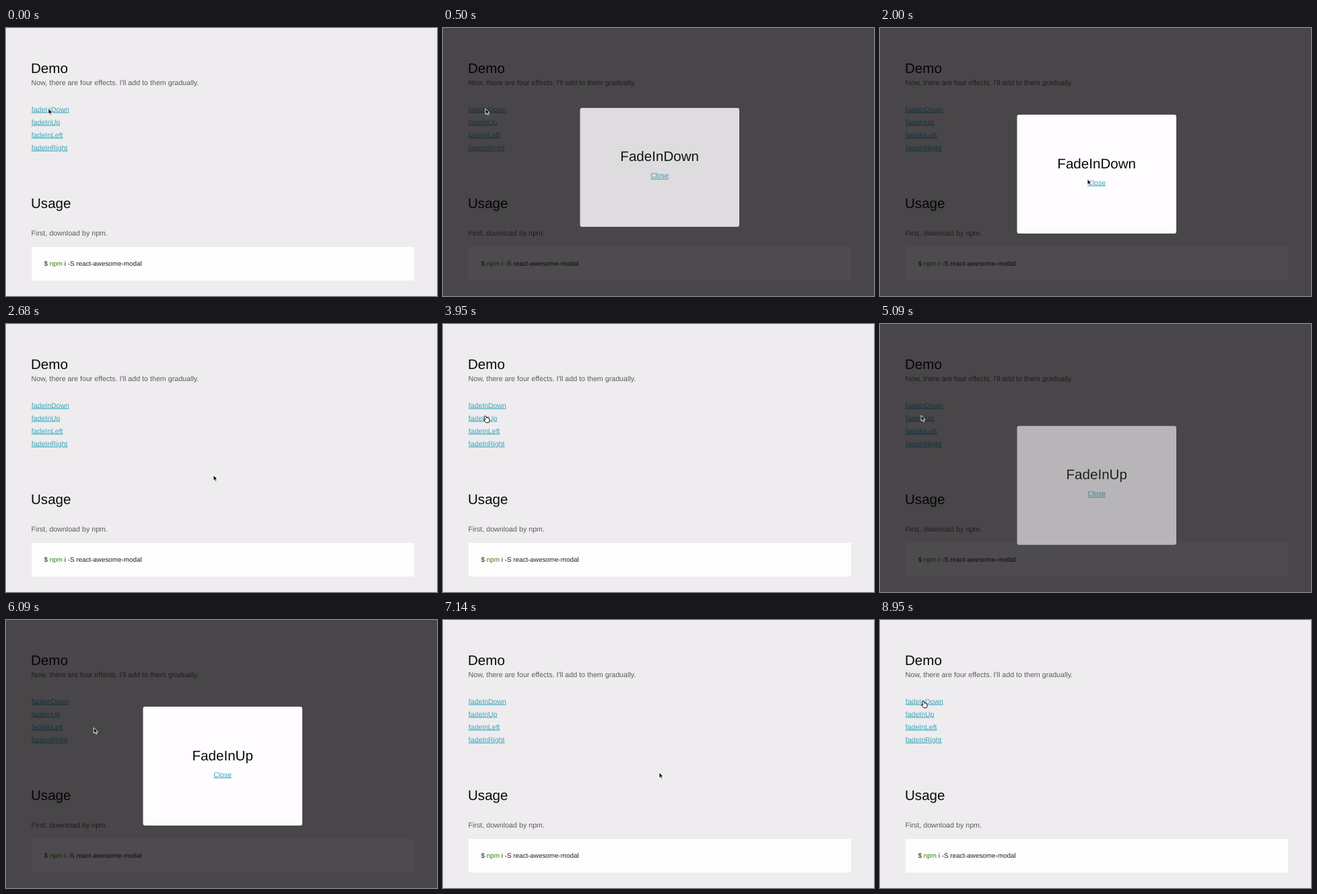
An HTML page that plays this animation: 640x399 px, repeating every 8.99 s.

```html
<!DOCTYPE html>
<html lang="en">
<head>
<meta charset="utf-8">
<title>Modal demo</title>
<style>
  html, body { margin: 0; width: 100%; height: 100%; overflow: hidden; background: #eeecee; }
  svg { display: block; font: 10.7px "Liberation Sans", Arial, sans-serif; fill: #5d5b5d; text-rendering: geometricPrecision; }
  .heading { font-size: 20.6px; fill: #0a0a0a; }
  .link { font-size: 10.5px; fill: #37a8ba; text-decoration: underline; }
  .code { font-size: 9.85px; fill: #222; }
  .middle { text-anchor: middle; }
</style>
</head>
<body>
<svg width="640" height="399" viewBox="0 0 640 399">
  <rect width="640" height="399" fill="#eeecee"/>
  <text class="heading" x="37" y="67">Demo</text>
  <text x="37.5" y="84.5">Now, there are four effects. I'll add to them gradually.</text>
  <g class="link">
    <text x="37.8" y="124.5">fadeInDown</text>
    <text x="37.8" y="143.5">fadeInUp</text>
    <text x="37.8" y="162.5">fadeInLeft</text>
    <text x="37.8" y="181.5">fadeInRight</text>
  </g>
  <text class="heading" x="37" y="267.5">Usage</text>
  <text x="37.5" y="308.8">First, download by npm.</text>
  <rect x="38" y="326" width="568" height="50" fill="#fefdfe"/>
  <text class="code" x="56.6" y="354">$ <tspan fill="#2f8500">npm</tspan> i -S react-awesome-modal</text>

  <rect id="mask" width="640" height="399" fill="#030003"/>
  <g id="panel">
    <rect x="203.5" y="129" width="236.5" height="177" rx="3" fill="#fefcff"/>
    <text id="title" class="heading middle" x="321.7" y="208.5"></text>
    <text class="link middle" x="321.6" y="233.5">Close</text>
  </g>

  <g id="cursor" stroke-linejoin="round">
    <path id="arrow" d="M0 0V8.4L2 6.6 3.3 9.6 4.8 9 3.5 6.1H6.1Z" fill="#000" stroke="#fff" stroke-width=".9"/>
    <path id="hand" d="M.1.2Q1.1-.8 1.9.4L2.9 3Q4-.1 4.6 3.2 5.6 2.4 6 3.8 7 3.3 7 5.2V7.2L6 9.8H2L-1.8 5.6Q-1.6 4.2.9 5.8L-.6 1.6Q-.7.5.1.2Z"
          fill="#fff" stroke="#111" stroke-width="1"/>
  </g>
</svg>
<script>
const LOOP = 8990, MASK_MS = 300, PANEL_DELAY = 290, PANEL_MS = 400, CLOSE_MS = 300, TRAVEL = 59;
const $ = id => document.getElementById(id);
const clamp = v => Math.min(1, Math.max(0, v));

const modals = [
  { title: 'FadeInDown', open: 0, close: 2150, from: -TRAVEL },
  { title: 'FadeInUp', open: 4659, close: 6830, from: TRAVEL },
];
// Cursor stops: time, x, y
const stops = [
  [0, 63, 120], [1020, 63, 120], [1700, 317, 232], [1900, 308, 225], [2780, 308, 225],
  [3560, 82, 142], [3900, 62, 137], [5000, 61, 136], [5820, 61, 136],
  [6620, 321, 227], [7730, 321, 227], [8560, 72, 126], [8860, 63, 121], [LOOP, 63, 121],
];
const handTimes = [[2030, 2200], [3640, 4720], [6600, 6900], [8600, LOOP]];

// CSS "ease": cubic-bezier(.25, .1, .25, 1)
function ease(x) {
  x = clamp(x);
  const bezier = (s, a, b) => 3 * s * (1 - s) ** 2 * a + 3 * s * s * (1 - s) * b + s ** 3;
  let low = 0, high = 1;
  for (let i = 0; i < 20; i++) {
    const mid = (low + high) / 2;
    if (bezier(mid, .25, .25) < x) low = mid; else high = mid;
  }
  return x === 1 ? 1 : bezier(low, .1, 1);
}

function cursorAt(t) {
  const i = stops.findIndex(stop => stop[0] > t);
  const [t0, x0, y0] = stops[i - 1], [t1, x1, y1] = stops[i];
  const u = (t - t0) / (t1 - t0), k = u * u * (3 - 2 * u);
  return [x0 + (x1 - x0) * k, y0 + (y1 - y0) * k];
}

function draw(now) {
  const t = now % LOOP;
  const modal = modals[t < modals[1].open ? 0 : 1];
  const remaining = 1 - ease((t - modal.close) / CLOSE_MS);
  const shown = ease((t - modal.open - PANEL_DELAY) / PANEL_MS) * remaining;
  $('mask').setAttribute('opacity', .7 * ease((t - modal.open) / MASK_MS) * remaining);
  $('panel').setAttribute('opacity', shown);
  $('panel').setAttribute('transform', `translate(0 ${modal.from * (1 - shown)})`);
  $('title').textContent = modal.title;

  const pointing = handTimes.some(([start, end]) => t >= start && t < end);
  $('cursor').setAttribute('transform', `translate(${cursorAt(t)})`);
  $('hand').style.display = pointing ? '' : 'none';
  $('arrow').style.display = pointing ? 'none' : '';
}

const start = performance.now();
function tick() {
  draw(performance.now() - start);
  requestAnimationFrame(tick);
}
tick();
</script>
</body>
</html>
```
